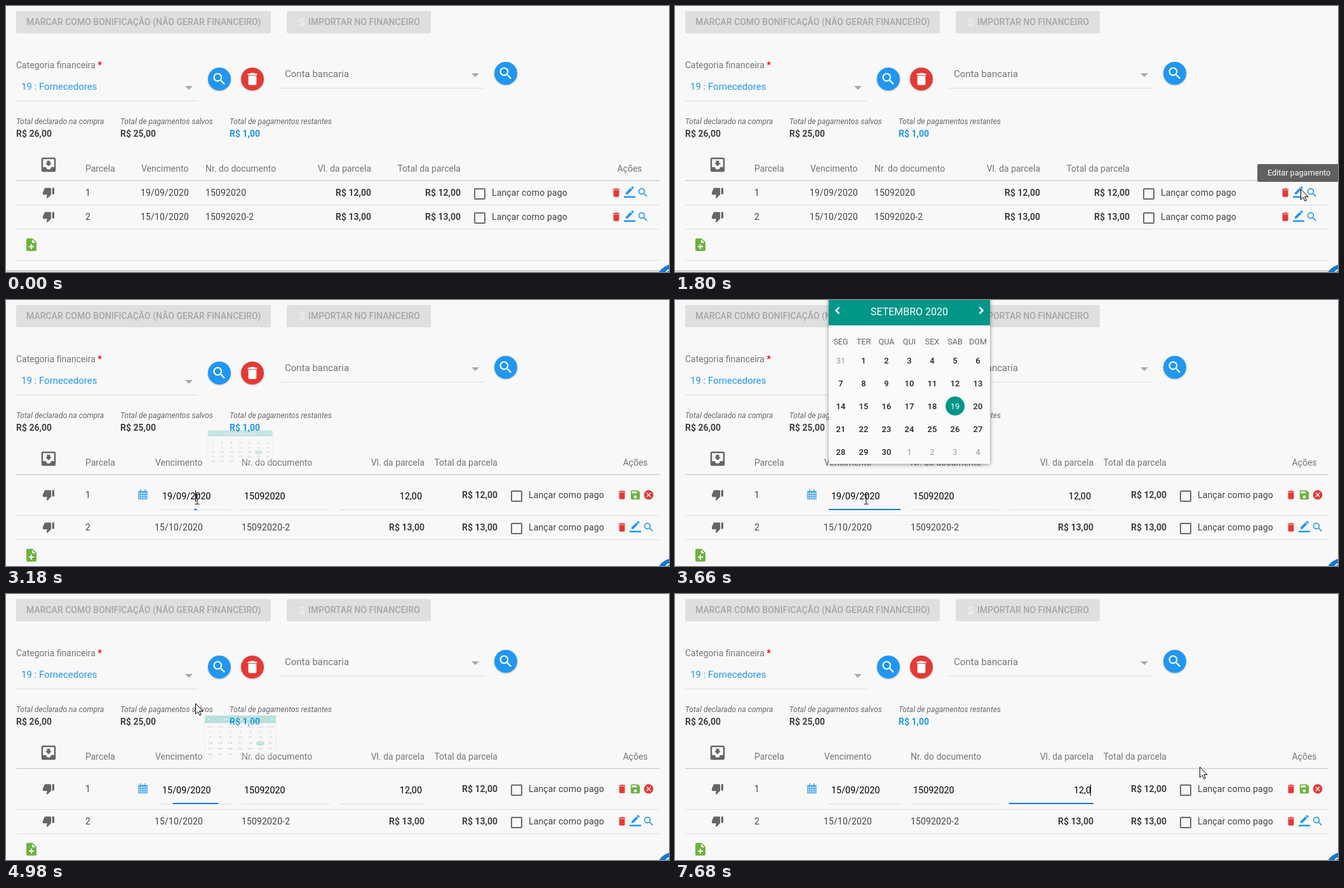
Write an HTML page that moves like this. It is 1044 px wide and 419 px high and loops after 8000 ms.

```html
<!DOCTYPE html>
<html lang="pt-BR">
<head>
<meta charset="utf-8">
<title>Pagamentos</title>
<style>
html, body { margin: 0; width: 100%; height: 100%; overflow: hidden; background: #f8f8f8; }
svg { display: block; width: 1044px; height: 419px; }
text { font: 14px Roboto, sans-serif; fill: #424242; white-space: pre; }
.btn { font-weight: 500; fill: #a6a6a6; }
.field { font-size: 15px; fill: #757575; }
.head { fill: #757575; }
.cell { letter-spacing: .15px; }
.bold { font-weight: 700; }
.note { font-size: 12px; font-style: italic; fill: #666; }
.blue { fill: #2196f3; }
.input { font-size: 14.4px; fill: #000; }
.tip { font-size: 12.6px; fill: #fff; }
.title { font-size: 16px; fill: #fff; }
.week { font-size: 12.6px; fill: #666; }
.day { font-size: 13px; font-weight: 500; fill: #222; }
.off { font-weight: 400; fill: #999; }
.on { font-weight: 400; fill: #fff; }
.round { filter: drop-shadow(0 1px 1px rgba(0,0,0,.28)); }
.panel { filter: drop-shadow(0 1px 3px rgba(0,0,0,.45)); }
</style>
</head>
<body>
<svg id="stage" viewBox="0 0 1044 419"></svg>
<script>
const LOOP = 8000, STEP = 60;
const GREY = '#666', BLUE = '#2196f3', RED = '#e53935', GREEN = '#6db33f', TEAL = '#009688';

const ICONS = {
  search: 'M15.5 14h-.79l-.28-.27A6.47 6.47 0 0 0 16 9.5 6.5 6.5 0 1 0 9.5 16c1.61 0 3.09-.59 4.23-1.57l.27.28v.79l5 4.99L20.49 19zm-6 0a4.5 4.5 0 1 1 0-9 4.5 4.5 0 0 1 0 9z',
  trash: 'M6 19c0 1.1.9 2 2 2h8c1.1 0 2-.9 2-2V7H6zM19 4h-3.5l-1-1h-5l-1 1H5v2h14z',
  thumb: 'M15 3H6c-.83 0-1.54.5-1.84 1.22l-3.02 7.05c-.09.23-.14.47-.14.73v2c0 1.1.9 2 2 2h6.31l-.95 4.57-.03.32c0 .41.17.79.44 1.06L9.83 23l6.59-6.59c.36-.36.58-.86.58-1.41V5c0-1.1-.9-2-2-2zm4 0v12h4V3z',
  inbox: 'M19 3H5a2 2 0 0 0-2 2v14c0 1.1.9 2 2 2h14c1.1 0 2-.9 2-2V5a2 2 0 0 0-2-2zm0 12h-4a3 3 0 0 1-6 0H5V5h14zm-3-5h-2V7h-4v3H8l4 4z',
  pencil: 'M17.750 7L14 3.250l-10 10V17h3.750zM20.710 4.040a1 1 0 0 0 0-1.410L18.370.290a1 1 0 0 0-1.410 0L15 2.250 18.750 6zM0 20.500h24V24H0z',
  save: 'M17 3H5a2 2 0 0 0-2 2v14c0 1.1.9 2 2 2h14c1.1 0 2-.9 2-2V7zm-5 16a3 3 0 1 1 0-6 3 3 0 0 1 0 6zm3-10H5V5h10z',
  cancel: 'M12 2a10 10 0 1 0 0 20 10 10 0 0 0 0-20zm5 13.59L15.59 17 12 13.41 8.41 17 7 15.59 10.59 12 7 8.41 8.41 7 12 10.59 15.59 7 17 8.41 13.41 12z',
  add: 'M14 2H6a2 2 0 0 0-2 2v16c0 1.1.9 2 2 2h12c1.1 0 2-.9 2-2V8zm2 14h-3v3h-2v-3H8v-2h3v-3h2v3h3zm-3-7V3.5L18.5 9z'
};

const text = (x, y, s, cls = '', anchor = 'start', id = '') =>
  `<text x="${x}" y="${y}" class="${cls}" text-anchor="${anchor}"${id && ` id="${id}"`}>${s}</text>`;
const rect = (x, y, w, h, fill, more = '') =>
  `<rect x="${x}" y="${y}" width="${w}" height="${h}" fill="${fill}" ${more}/>`;
const icon = (name, x, y, k, fill) =>
  `<path d="${ICONS[name]}" fill="${fill}" transform="translate(${x} ${y}) scale(${k}) translate(-12 -12)"/>`;
const round = (name, x, y, fill) =>
  `<circle class="round" cx="${x}" cy="${y}" r="18" fill="${fill}"/>` + icon(name, x, y, 1.06, '#fff');
const rule = (y, h = 1, fill = '#dedede') => rect(16, y, 1013, h, fill);
const drop = (x, y) => `<path d="M${x} ${y}h12l-6 6z" fill="#aaa"/>`;
const check = (x, y) =>
  `<rect x="${x - 8}" y="${y - 8}" width="16" height="16" rx="1" fill="none" stroke="#6b6b6b" stroke-width="2"/>`;

function header() {
  const total = (x, label, value, cls) => text(x, 186, label, 'note') + text(x, 206, value, 'bold ' + cls);
  return rect(16, 8, 401, 35, '#dfdfdf', 'rx="2"') +
    text(32, 30, 'MARCAR COMO BONIFICAÇÃO (NÃO GERAR FINANCEIRO)', 'btn') +
    rect(442, 8, 227, 35, '#dfdfdf', 'rx="2"') +
    '<text x="461" y="31" style="font-size:17px;fill:#f4f4f4">$</text>' +
    text(476, 30, 'IMPORTAR NO FINANCEIRO', 'btn') +
    text(16, 98, 'Categoria financeira <tspan fill="#e00" font-weight="700">*</tspan>', 'head') +
    text(24, 132, '19 : Fornecedores', 'field blue') + drop(282, 126) + rect(16, 149, 286, 1, '#dcdcdc') +
    round('search', 336, 115, BLUE) + round('trash', 388, 115, RED) +
    text(439, 112, 'Conta bancaria', 'field') + drop(733, 106) + rect(431, 129, 322, 1, '#dcdcdc') +
    round('search', 787, 106, BLUE) +
    total(16, 'Total declarado na compra', 'R$ 26,00', '') +
    total(180, 'Total de pagamentos salvos', 'R$ 25,00', '') +
    total(352, 'Total de pagamentos restantes', 'R$ 1,00', 'blue') +
    icon('inbox', 67, 250, 1.25, GREY) + text(125, 261, 'Parcela', 'head') + rule(274, 2, '#d9d9d9');
}

function heads(due, doc, val, sum, act) {
  return text(due, 261, 'Vencimento', 'head') + text(doc, 261, 'Nr. do documento', 'head') +
    text(val, 261, 'Vl. da parcela', 'head', 'end') + text(sum, 261, 'Total da parcela', 'head', 'end') +
    text(act, 261, 'Ações', 'head', 'middle');
}

// Parts that every row has; shift moves the right-hand columns.
function rowBase(y, n, sum, shift) {
  return icon('thumb', 67, y, .82, GREY) + text(125, y + 5, n, 'cell') +
    text(716 + shift, y + 5, sum, 'bold', 'end') + check(746 + shift, y + 2) +
    text(765 + shift, y + 5, 'Lançar como pago', 'cell');
}

function row(y, n, due, doc, sum, x, shift, act) {
  return rowBase(y, n, sum, shift) + text(x[0], y + 5, due, 'cell') + text(x[1], y + 5, doc, 'cell') +
    text(x[2], y + 5, sum, 'bold', 'end') +
    icon('trash', act, y, .74, RED) + icon('pencil', act + 21, y - 1, .75, BLUE) + icon('search', act + 42, y, .8, BLUE);
}

function viewTable() {
  const x = [212, 314, 575];
  return heads(213, 314, 575, 716, 982) +
    row(294, '1', '19/09/2020', '15092020', 'R$ 12,00', x, 0, 961) + rule(313) +
    row(332, '2', '15/10/2020', '15092020-2', 'R$ 13,00', x, 0, 961) + rule(351) +
    icon('add', 40, 376, 1, GREEN) + rule(400) + rect(0, 416.5, 1044, 1.5, '#b5b5b5');
}

function editTable() {
  let grid = '';
  for (const x of [212, 215.5, 219]) grid += `M${x} 302v11`;
  for (const y of [303, 306.5, 310]) grid += `M209 ${y}h13`;
  return heads(235, 371, 659, 774, 991) + rowBase(307, '1', 'R$ 12,00', 58) +
    `<path d="M209 301.500h13v12h-13zM212 298v4M219 298v4${grid}" fill="none" stroke="${BLUE}" stroke-width="1.2"/>` +
    text(246, 314, '', 'input', 'start', 'date') + text(375, 314, '15092020', 'input') +
    text(655, 314, '', 'input', 'end', 'value') +
    INPUTS.map(([a, b]) => rect(a, 330, b - a, 1, '#dcdcdc')).join('') +
    rect(242, 329, 113, 2, '#1976d2', 'id="dateLine"') + rect(526, 329, 133, 2, '#1976d2', 'id="valueLine"') +
    rect(298, 300, 1, 18, '#000', 'id="dateCaret"') + rect(620, 300, 1, 18, '#000', 'id="valueCaret"') +
    icon('trash', 970, 307, .74, RED) + icon('save', 991, 307, .8, GREEN) + icon('cancel', 1012, 307, .74, RED) +
    rule(339) + row(358, '2', '15/10/2020', '15092020-2', 'R$ 13,00', [234, 371, 659], 58, 970) + rule(377) +
    icon('add', 40, 402, 1, GREEN);
}

function calendar() {
  let s = rect(242, -7, 254, 265, '#fafafa', 'class="panel"') + rect(242, -7, 254, 47, TEAL) +
    text(369, 24, 'SETEMBRO 2020', 'title', 'middle') +
    '<path d="M258.500 11.500l-5 5 5 5M479.500 11.500l5 5-5 5" fill="none" stroke="#fff" stroke-width="2.6"/>' +
    `<circle cx="441" cy="167" r="15" fill="${TEAL}"/>`;
  'SEG TER QUA QUI SEX SAB DOM'.split(' ').forEach((d, i) => s += text(261 + 36 * i, 70, d, 'week', 'middle'));
  for (let i = 0; i < 35; i++) {
    const day = i === 0 ? 31 : i > 30 ? i - 30 : i;
    const cls = i === 0 || i > 30 ? 'off' : i === 19 ? 'on' : '';
    s += text(261 + 36 * (i % 7), 99.5 + 36 * Math.floor(i / 7), day, 'day ' + cls, 'middle');
  }
  return s;
}

const INPUTS = [[242, 355], [371, 510], [526, 659]];
const $ = id => document.getElementById(id);
$('stage').innerHTML = rect(0, 0, 1044, 419, '#f8f8f8') + header() +
  `<g id="view">${viewTable()}</g><g id="edit">${editTable()}</g>` +
  '<circle cx="1050" cy="432" r="25" fill="#1976d2"/><circle cx="1046" cy="423" r="7.5" fill="none" stroke="#fff" stroke-width="2"/>' +
  `<g id="cal">${calendar()}</g>` +
  `<g id="tip">${rect(917, 249, 130, 28, '#585858', 'rx="2"')}${text(933, 267, 'Editar pagamento', 'tip')}</g>` +
  `<g id="cursor" stroke-linejoin="round">
    <path id="arrow" d="M.5.500V17l3.800-3.600 2.600 5.800 2.400-1-2.600-5.700h5.300z" fill="#fff" stroke="#000"/>
    <path id="beam" d="M-3.500-7.500h3l.5.500.5-.5h3M0-7V7M-3.500 7.500h3L0 7l.5.500h3" fill="none" stroke="#000"/>
    <path id="hand" d="M-1.500 1.500q1.500-2 3 0V8l2.500.500 2.500.500 2.500 1 1.500 2v4l-2 3.500V22H0v-2.500l-5-6.500q0-2 2-1.500l1.500 1.500z" fill="#fff" stroke="#000"/>
  </g>`;

const clamp = v => Math.max(0, Math.min(1, v));
// Standard material curve, cubic-bezier(.4, 0, .2, 1).
function ease(u) {
  let lo = 0, hi = 1;
  for (let i = 0; i < 20; i++) {
    const s = (lo + hi) / 2, r = 1 - s;
    if (1.2 * r * r * s + .6 * r * s * s + s * s * s < u) lo = s; else hi = s;
  }
  return lo * lo * (3 - 2 * lo);
}
const ramp = (t, start, len) => {
  const u = clamp((t - start) / len);
  return u === 0 || u === 1 ? u : ease(u);
};

const PATH = [
  [420, 1030, 65], [700, 975, 100], [960, 910, 170], [1200, 930, 237], [1500, 980, 285], [1680, 985, 288],
  [2040, 985, 288], [2280, 800, 294], [2460, 705, 297], [2640, 543, 303], [2880, 305, 312], [3000, 301, 314],
  [3660, 301, 314], [3780, 301, 275], [3960, 315, 235], [4260, 290, 162], [4440, 298, 176], [4500, 298, 172],
  [4980, 298, 172], [5100, 312, 182], [5220, 387, 240], [5340, 465, 277], [5520, 555, 298], [5640, 620, 310],
  [5760, 623, 310], [6240, 623, 310], [6300, 680, 303], [6420, 802, 285], [6540, 822, 275], [6660, 826, 272]
];
function pointer(t) {
  const i = PATH.findIndex(p => p[0] > t);
  if (i < 0) return PATH[PATH.length - 1].slice(1);
  const [a, x, y] = PATH[i - 1], [b, u, v] = PATH[i], k = (t - a) / (b - a);
  return [x + (u - x) * k, y + (v - y) * k];
}

const show = (id, on) => $(id).style.display = on ? '' : 'none';
function scaleLine(id, mid, k) {
  $(id).setAttribute('transform', `translate(${mid} 0) scale(${k} 1) translate(${-mid} 0)`);
}

function draw(t) {
  const editing = t >= 1980;
  show('view', !editing);
  show('edit', editing);

  const tip = Math.min(clamp((t - 1560) / 120), clamp((2220 - t) / 120));
  $('tip').style.opacity = .95 * tip;

  const open = ramp(t, 3110, 300) - ramp(t, 4860, 250);
  show('cal', open > .005);
  $('cal').setAttribute('opacity', open);
  $('cal').setAttribute('transform',
    `translate(369 258) scale(${.25 + .75 * open} ${open}) translate(-369 -258)`);

  $('date').textContent = t < 4860 ? '19/09/2020' : '15/09/2020';
  scaleLine('dateLine', 298.5, ramp(t, 3144, 300) - ramp(t, 4890, 300));
  show('dateCaret', t >= 3150 && t < 4680 && (t - 3150) % 1020 < 510);

  $('value').textContent = t < 7680 ? '12,00' : '12,0';
  scaleLine('valueLine', 592.5, ramp(t, 6167, 300));
  const steps = [[7560, 654], [7440, 647], [7320, 639], [7200, 636], [6540, 628], [0, 620]];
  $('valueCaret').setAttribute('x', steps.find(s => t >= s[0])[1]);
  show('valueCaret', t >= 6180 && !(t >= 7020 && t < 7200));

  show('cursor', t >= 420);
  if (t < 420) return;
  const [x, y] = pointer(t).map(Math.round);
  const hand = t > 3480 && t < 4860 && y < 258;
  const beam = editing && y > 290 && y < 331 && INPUTS.some(([a, b]) => x >= a && x <= b);
  $('cursor').setAttribute('transform', `translate(${x} ${y})`);
  show('hand', hand);
  show('beam', beam);
  show('arrow', !hand && !beam);
}

function tick() {
  const t = performance.now() % LOOP;
  draw(t - t % STEP);
  requestAnimationFrame(tick);
}
tick();
</script>
</body>
</html>
```
